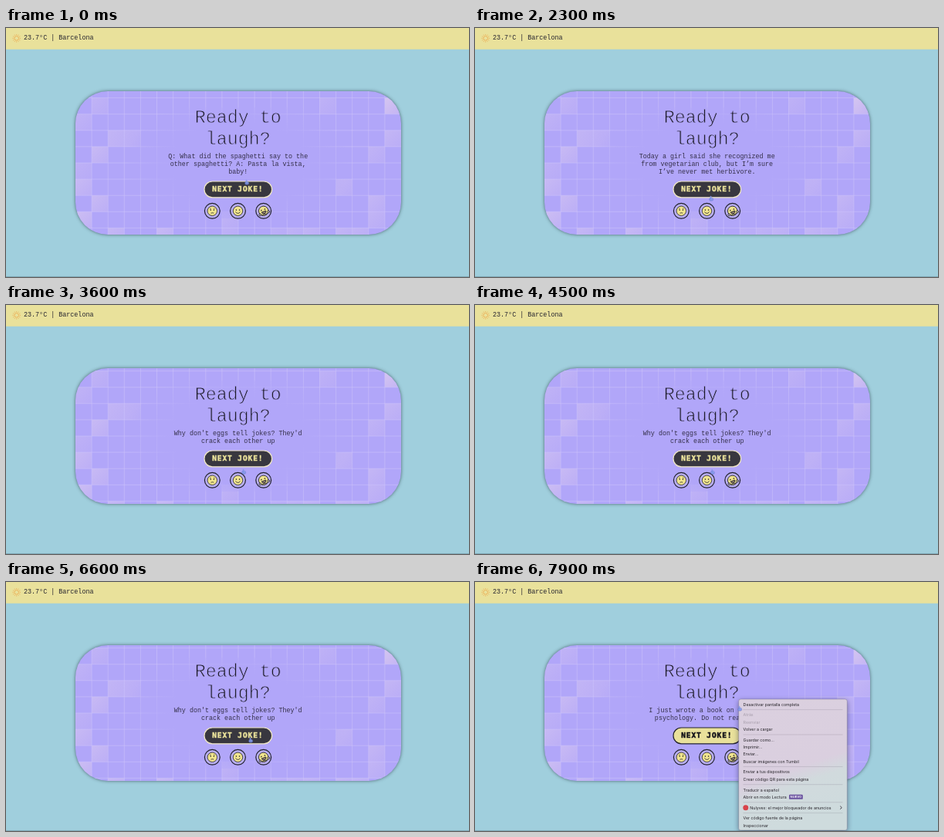
An HTML page with a canvas that plays this animation: 600 by 323 pixels, repeating every 8000 ms.

```html
<!DOCTYPE html>
<html lang="en">
<head>
<meta charset="utf-8">
<title>Joke card</title>
<style>
html, body { margin: 0; width: 100%; height: 100%; overflow: hidden; background: #a0cfdd; }
canvas { display: block; width: 600px; height: 323px; }
</style>
</head>
<body>
<canvas id="stage" width="600" height="323"></canvas>
<script>
const ctx = document.getElementById('stage').getContext('2d');
const LOOP = 8000, STEP = 100;
const MONO = '"Liberation Mono", monospace';
const INK = '#25242f', YELLOW = '#e9e19b', LILAC = '#b1a6f9';
const CARD = { x: 90, y: 82, w: 422, r: 42 }, CELL = 21.1, MID = 300.7;

const jokes = [
  { at: 0, lines: ['Q: What did the spaghetti say to the', 'other spaghetti? A: Pasta la vista,', 'baby!'] },
  { at: 1500, lines: ['I asked the librarian whether they', 'had any books about paranoia. She', 'looked up slowly and whispered:', "They're right behind you."] },
  { at: 2100, lines: ['Today a girl said she recognized me', 'from vegetarian club, but I’m sure', 'I’ve never met herbivore.'] },
  { at: 3500, lines: ["Why don't eggs tell jokes? They'd", 'crack each other up'] },
  { at: 7000, lines: ['I just wrote a book on reverse', 'psychology. Do not read it.'] }
];

// time, x, y
const cursorPath = [
  [0, 312, 200], [1100, 309, 214], [2300, 306, 221], [3600, 308, 216], [4400, 308, 216],
  [5300, 300, 222], [5800, 300, 222], [6600, 317, 205], [7100, 317, 205], [7700, 343, 164], [8000, 343, 164]
];

// column, row, strength, span
const tiles = [
  [19, 0, .95], [15, 0, .35], [1, 0, .4], [0, 1, .4], [2, 2, .45, 2], [1, 3, .6], [19, 2, .5],
  [18, 3, .4], [0, 4, .35], [16, 5, .45], [0, 5, .6], [1, 6, .6], [18, 6, .5], [0, 7, .75],
  [18, 7, .45], [9, 7, .4], [2, 8, .55], [5, 8, .6], [9, 8, .35], [12, 8, .3], [13, 8, .4],
  [14, 8, .45], [16, 8, .5], [17, 8, .45]
];

const menuGroups = [
  ['Desactivar pantalla completa'],
  ['-Atrás', '-Reenviar', 'Volver a cargar'],
  ['Guardar como…', 'Imprimir…', 'Enviar…', 'Buscar imágenes con Tumbil'],
  ['Enviar a tus dispositivos', 'Crear código QR para esta página'],
  ['Traducir a español', 'Abrir en modo Lectura'],
  ['Nulyvex: el mejor bloqueador de anuncios'],
  ['Ver código fuente de la página', 'Inspeccionar']
];

function text(str, x, y, font, color = INK, align = 'left') {
  ctx.font = font;
  ctx.fillStyle = color;
  ctx.textAlign = align;
  ctx.fillText(str, x, y);
}

// Trims the glyph edges with the card colour for a light weight
function heading(str, y) {
  text(str, MID, y, '23.35px ' + MONO, '#1c1a26', 'center');
  ctx.strokeStyle = LILAC;
  ctx.lineWidth = .8;
  ctx.strokeText(str, MID, y);
}

function pill(x, y, w, h, r, fill, stroke, width = 1) {
  ctx.beginPath();
  ctx.roundRect(x, y, w, h, r);
  paint(fill, stroke, width);
}

function disc(x, y, r, fill, stroke, width = 1) {
  ctx.beginPath();
  ctx.arc(x, y, r, 0, Math.PI * 2);
  paint(fill, stroke, width);
}

function paint(fill, stroke, width) {
  if (fill) { ctx.fillStyle = fill; ctx.fill(); }
  if (stroke) { ctx.strokeStyle = stroke; ctx.lineWidth = width; ctx.stroke(); }
}

function line(points, color = INK, width = 1) {
  ctx.beginPath();
  points.forEach(([x, y], i) => i ? ctx.lineTo(x, y) : ctx.moveTo(x, y));
  paint(null, color, width);
}

function drawPage() {
  ctx.fillStyle = '#a0cfdd';
  ctx.fillRect(0, 0, 600, 323);
  ctx.fillStyle = 'rgba(70, 100, 115, .35)';
  ctx.fillRect(0, 322, 600, 1);
  ctx.fillStyle = YELLOW;
  ctx.fillRect(0, 0, 600, 27.7);
  disc(13.7, 13.3, 2.8, null, '#ecae54', .9);
  for (let i = 0; i < 12; i++) {
    const a = i * Math.PI / 6, c = Math.cos(a), s = Math.sin(a);
    line([[13.7 + 4 * c, 13.3 + 4 * s], [13.7 + 5.3 * c, 13.3 + 5.3 * s]], '#ecae54', .9);
  }
  text('23.7°C | Barcelona', 23, 15.4, '8.38px ' + MONO);
}

function drawCard(h) {
  const { x, y, w, r } = CARD;
  ctx.save();
  ctx.shadowColor = 'rgba(45, 65, 75, .75)';
  ctx.shadowBlur = 4;
  pill(x, y, w, h, r, LILAC);
  ctx.restore();

  ctx.save();
  ctx.beginPath();
  ctx.roundRect(x, y, w, h, r);
  ctx.clip();
  // The pattern stays centred as the card grows
  const top = y + h / 2 - 4 * CELL;
  for (const [col, row, alpha, span = 1] of tiles) {
    const tx = x + col * CELL, ty = top + row * CELL, tw = CELL * span;
    const fill = ctx.createLinearGradient(tx, ty, tx + tw, ty + CELL);
    fill.addColorStop(0, `rgba(215, 199, 240, ${alpha})`);
    fill.addColorStop(1, `rgba(211, 193, 240, ${alpha * .55})`);
    ctx.fillStyle = fill;
    ctx.fillRect(tx, ty, tw, CELL);
  }
  const lineColor = 'rgba(207, 197, 250, .65)';
  for (let c = 1; c < 20; c++) line([[x + c * CELL, y], [x + c * CELL, y + h]], lineColor, .8);
  for (let row = -1; row < 10; row++) line([[x, top + row * CELL], [x + w, top + row * CELL]], lineColor, .8);

  ctx.translate(MID, y + h / 2);
  ctx.scale(1.65, 1);
  const veil = ctx.createRadialGradient(0, 0, 52, 0, 0, 88);
  veil.addColorStop(0, LILAC);
  veil.addColorStop(1, 'rgba(177, 166, 249, 0)');
  ctx.fillStyle = veil;
  ctx.fillRect(-90, -72, 180, 144);
  ctx.restore();
}

function drawButton(y, hover) {
  const color = hover ? YELLOW : '#15141a';
  pill(257, y, 87.6, 20.8, 10.4, hover ? '#38373f' : YELLOW, hover ? '#f0e7c4' : INK, 1.2);
  ctx.letterSpacing = '.9px';
  text('NEXT JOKE!', 267.2, y + 13.4, 'bold 9.5px "DejaVu Sans Mono", monospace', color);
  ctx.strokeStyle = color;
  ctx.lineWidth = .5;
  ctx.strokeText('NEXT JOKE!', 267.2, y + 13.4);
  ctx.letterSpacing = '0px';
}

function drawFace(x, y, mood) {
  disc(x, y, 9.9, '#b8aef1', '#20202b', 1.2);
  ctx.save();
  ctx.translate(x, y);
  if (mood === 'laugh') ctx.rotate(-.35);
  disc(0, 0, 6.2, '#f1e58d', '#33303a', .9);
  if (mood === 'laugh') {
    line([[-3.2, -2.2], [-1.6, -1.6], [-3.2, -1]], INK, .7);
    line([[3.2, -2.2], [1.6, -1.6], [3.2, -1]], INK, .7);
    ctx.beginPath();
    ctx.arc(0, .8, 3, 0, Math.PI);
    ctx.closePath();
    paint('#8d7d68', INK, .8);
    disc(-5.8, 3.2, 1.4, '#c9c0b8', INK, .8);
    disc(5.8, 3.2, 1.4, '#c9c0b8', INK, .8);
    line([[-4, 5], [-1.5, 4.4], [1.5, 5.2], [4, 4.6]], INK, .9);
  } else {
    disc(-2.1, -1.2, .8, INK);
    disc(2.1, -1.2, .8, INK);
    ctx.beginPath();
    if (mood === 'smile') {
      ctx.arc(0, -.1, 3.2, .4, Math.PI - .4);
    } else {
      ctx.moveTo(-1.8, 2.9);
      ctx.quadraticCurveTo(0, 2, 2, 2.8);
    }
    paint(null, INK, .8);
    if (mood === 'meh') {
      line([[-3.3, -2.9], [-1.5, -3.3]], INK, .6);
      line([[1.5, -3.4], [3.3, -2.9]], INK, .6);
    }
  }
  ctx.restore();
}

function drawCursor(x, y) {
  ctx.save();
  ctx.translate(x, y);
  ctx.scale(.85, .85);
  ctx.globalAlpha = .85;
  pill(-1.5, -3.8, 2, 5, 1, '#8498ee');
  pill(-2.8, -.8, 6, 4.6, 2, '#7d94e6', 'rgba(86, 96, 184, .6)', .6);
  line([[.6, -.5], [.6, 1.2]], '#a9b8f5', .5);
  line([[2, -.3], [2, 1.2]], '#a9b8f5', .5);
  ctx.restore();
}

function drawMenu() {
  const font = '5.3px Inter, sans-serif';
  ctx.save();
  ctx.shadowColor = 'rgba(20, 20, 50, .5)';
  ctx.shadowBlur = 7;
  ctx.shadowOffsetY = 2;
  const fill = ctx.createLinearGradient(342, 152, 400, 322);
  fill.addColorStop(0, '#dbd0df');
  fill.addColorStop(.6, '#dacfdf');
  fill.addColorStop(.72, '#d1dadd');
  fill.addColorStop(1, '#cedbdd');
  pill(341.7, 152, 140.6, 170, 2.8, fill);
  ctx.restore();
  pill(341.7, 152, 140.6, 170, 2.8, null, 'rgba(110, 105, 130, .6)', .6);

  let y = 158.7;
  menuGroups.forEach((group, g) => {
    if (g) {
      line([[347.5, y - 2.3], [476.5, y - 2.3]], 'rgba(110, 100, 120, .35)', .6);
      y += 4.6;
    }
    for (const item of group) {
      const off = item[0] === '-', blocker = item.startsWith('Nulyvex');
      text(off ? item.slice(1) : item, blocker ? 356.3 : 347.6, y + 1.9, font, off ? '#a9a0ae' : '#262329');
      if (blocker) {
        disc(350.8, y, 3.5, '#d8444b');
        line([[473.2, y - 2], [475.3, y], [473.2, y + 2]], '#36323b', .9);
      }
      if (item.startsWith('Abrir')) {
        pill(407, y - 3, 17.8, 6, 1.2, '#69529f');
        text('NUEVO', 415.9, y + 1.5, 'bold 4.1px Inter, sans-serif', '#f5f1fa', 'center');
      }
      y += 9.25;
    }
  });
}

function cursorAt(t) {
  const i = cursorPath.findIndex(([end]) => end > t);
  const [t0, x0, y0] = cursorPath[i - 1], [t1, x1, y1] = cursorPath[i];
  const p = (t - t0) / (t1 - t0), k = p * p * (3 - 2 * p);
  return [x0 + (x1 - x0) * k, y0 + (y1 - y0) * k];
}

function draw(t) {
  const { lines } = jokes.findLast(joke => joke.at <= t);
  const grow = 10 * (lines.length - 2);
  const hover = t < 4700 || (t >= 6200 && t < 7400);

  drawPage();
  drawCard(176 + grow);
  heading('Ready to', 123);
  heading('laugh?', 151);
  lines.forEach((str, i) => text(str, MID, 169.4 + i * 10, '8.38px ' + MONO, '#35304a', 'center'));
  drawButton(189 + grow, hover);
  ['meh', 'smile', 'laugh'].forEach((mood, i) => drawFace(267.3 + 33.2 * i, 227.3 + grow, mood));
  if (t >= 7800) drawMenu();
  drawCursor(...cursorAt(t));
}

function tick(now) {
  draw(Math.floor(now % LOOP / STEP) * STEP);
  requestAnimationFrame(tick);
}
draw(0);
requestAnimationFrame(tick);
</script>
</body>
</html>
```
